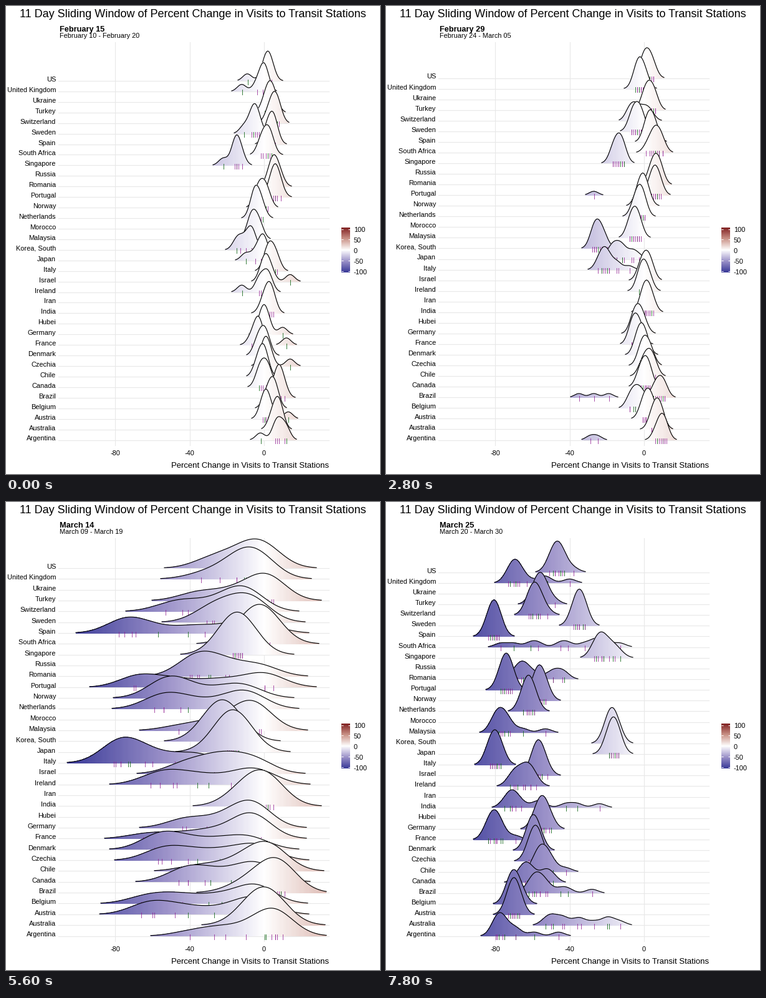
Animation of 600 by 750 pixels, one loop 8 s. Source, as a matplotlib script:

```python
import numpy as np
import matplotlib.pyplot as plt
from matplotlib.animation import FuncAnimation
from matplotlib.collections import LineCollection, PolyCollection
from matplotlib.colors import LinearSegmentedColormap

W, H, DPI = 600, 750, 100
FRAMES, STEP = 40, 200
DAYS = np.arange(45)          # day 0 is Saturday, February 15
ZERO, UNIT = 414, 2.9875      # x of 0 % and pixels per percent
LEFT, RIGHT = 84, 518
BOTTOM = 695.5
OVERLAP = 4                   # tallest possible ridge, in rows
GRID = "#e8e8e8"

plt.rcParams["font.family"] = "Liberation Sans"

rows, series = [], {}


def add(name, start=None, *steps, sunday=0, carnival=0):
    """Daily visits: smooth steps (day, level) from a start level, plus scatter.

    sunday shifts the first Sunday, carnival is a number of days off.
    """
    rows.append(name)
    if start is None:
        return
    scatter = 7 * ((DAYS * 0.618 + 0.37 * len(rows)) % 1 - 0.5)
    vals, level = start + scatter, start
    for day, to in steps:
        vals += (to - level) / (1 + np.exp((day - DAYS) / 1.5))
        level = to
    if sunday:
        vals[1] = start + sunday
    n = carnival
    vals[9:9 + n] = -27 + (np.arange(n) - (n - 1) / 2) * 4 * (n - 1)
    series[name] = np.round(vals)


add("US", 2, (29, -18), (33, -48), sunday=-11)
add("United Kingdom", -2, (28, -12), (34, -71), sunday=-10)
add("Ukraine")
add("Turkey", 3, (31.5, -57))
add("Switzerland", 5, (13, -8), (30.5, -59))
add("Sweden", -4, (29.5, -35), sunday=-7)
add("Spain", 4, (27.6, -81))
add("South Africa", 1, (11, 8), (21, 0), (33, -24), (40.5, -79))
add("Singapore", -14, (37, -25), sunday=-8)
add("Russia")
add("Romania", 6, (26, -38), (37, -67))
add("Portugal", 6, (28.2, -74), carnival=1)
add("Norway", -1, (26.6, -56))
add("Netherlands", -3, (28.4, -62))
add("Morocco")
add("Malaysia", -5, (32.7, -78))
add("Korea, South", -5, (6, -25), (30, -17), sunday=-10)
add("Japan", -2, (12, -17), sunday=-8)
add("Italy", 5, (9, -22), (25.3, -80))
add("Israel", 1, (26, -25), (32, -58), sunday=13)
add("Ireland", 0, (28.3, -61), (41, -74), sunday=-12)
add("Iran")
add("India", 2, (30, -9), (35.7, -73))
add("Hubei")
add("Germany", 1, (9, -4), (31, -56), sunday=9)
add("France", -4, (31.4, -82), sunday=16)
add("Denmark", -1, (27.3, -59))
add("Czechia", 1, (28.4, -59), sunday=13)
add("Chile", -2, (11, 4), (32, -56))
add("Canada", 0, (28.8, -48), (37, -65))
add("Brazil", 8, (33.8, -59), carnival=3)
add("Belgium", 4, (9, -10), (14, 0), (29.3, -70))
add("Austria", 2, (28.6, -70), sunday=11)
add("Australia", 7, (27, -3), (34, -22), (39, -53))
add("Argentina", 9, (30.5, -28), (34, -78), sunday=-11, carnival=2)

cmap = LinearSegmentedColormap.from_list(
    "muted", ["#3a3a98", "#9c92c9", "#ffffff", "#cb958a", "#832424"])
xs = np.arange(96, 515, 2.0)
us = (xs - ZERO) / UNIT
strip_colors = cmap(((us[:-1] + us[1:]) / 2 + 105) / 210)
PURPLE, GREEN = (0.56, 0.1, 0.56, 0.75), (0.1, 0.42, 0.12, 0.85)


def bandwidth(i):
    """Widest while most places are in the middle of their fall."""
    return 2.4 + 8.6 * np.exp(-((i - 30) / 6) ** 2)


def top_base(i):
    """Baseline of the first row; it rises as its ridge gets flatter."""
    return np.interp(i, [0, 14, 23, 28, 34, 39], [120, 115.5, 107, 106, 101, 112.5])


def window(i):
    return slice(max(i - 5, 0), i + 6)


def profile(name, i):
    vals = series[name][window(i)]
    return np.exp(-((us[:, None] - vals) / bandwidth(i)) ** 2 / 2).mean(axis=1)


def date(day):
    n = 15 + day
    return f"February {n:02d}" if n <= 29 else f"March {n - 29:02d}"


def px(width):
    return width * 72 / DPI


fig = plt.figure(figsize=(W / DPI, H / DPI), dpi=DPI, facecolor="white")
ax = fig.add_axes([0, 0, 1, 1])
ax.axis("off")


def text(x, y, s, size, **kw):
    return ax.text(x, y, s, fontsize=px(size), va="baseline", **kw)


text(300, 18, "11 Day Sliding Window of Percent Change in Visits to Transit Stations",
     18, ha="center")
day_text = text(86, 41, "", 12.7, weight="bold")
span_text = text(86, 51, "", 11)
text(RIGHT, 740, "Percent Change in Visits to Transit Stations", 13.15, ha="right")

for v in (-80, -40, 0):
    x = ZERO + v * UNIT
    ax.plot([x, x], [58, 704], color=GRID, lw=px(1.1), zorder=1)
    text(x, 720, str(v), 11, ha="center")

# colour key
ax.imshow(np.linspace(1, 0, 72)[:, None], cmap=cmap, aspect="auto",
          extent=(538, 552, 427, 355), zorder=2)
for v in (100, 50, 0, -50, -100):
    y = 391 - v * 0.335
    for x in (538, 549):
        ax.plot([x, x + 3], [y, y], color="white", lw=px(1), zorder=3,
                solid_capstyle="butt")
    text(558, y + 5, str(v), 11)

labels, grids, ridges = [], [], {}
for r, name in enumerate(rows):
    labels.append(text(80, 0, name, 11, ha="right"))
    grids += ax.plot([LEFT, RIGHT], [0, 0], color=GRID, lw=px(1.1), zorder=1)
    if name in series:
        z = 10 + 3 * r
        fill = PolyCollection([], linewidths=0, antialiaseds=False, zorder=z)
        ticks = LineCollection([], linewidths=px(1), antialiaseds=False, zorder=z + 1)
        ax.add_collection(fill, autolim=False)
        ax.add_collection(ticks, autolim=False)
        line, = ax.plot([], [], color="black", lw=px(1.15), zorder=z + 2)
        ridges[name] = fill, ticks, line

ax.set_xlim(0, W)
ax.set_ylim(H, 0)


def draw_ridge(name, i, base, height):
    fill, ticks, line = ridges[name]
    p = profile(name, i)
    keep = p > 0.01
    y = base - height * p
    line.set_data(xs, np.where(keep, y, np.nan))

    on = np.flatnonzero(keep[:-1] & keep[1:])
    fill.set_verts([[(xs[k], base), (xs[k], y[k]), (xs[k + 1], y[k + 1]),
                     (xs[k + 1], base)] for k in on])
    fill.set_facecolor(strip_colors[on])

    w = window(i)
    tx = np.floor(ZERO + series[name][w] * UNIT) + 0.5
    ticks.set_segments([[(x, base - 2.5), (x, base + 5.5)] for x in tx])
    ticks.set_color([GREEN if d % 7 < 2 else PURPLE for d in DAYS[w]])


def update(i):
    day_text.set_text(date(i))
    span_text.set_text(f"{date(i - 5)} - {date(i + 5)}")
    top = top_base(i)
    gap = (BOTTOM - top) / (len(rows) - 1)
    for r, name in enumerate(rows):
        base = top + gap * r
        labels[r].set_y(base + 1)
        grids[r].set_ydata([base, base])
        if name in ridges:
            draw_ridge(name, i, base, OVERLAP * gap)
    return []


anim = FuncAnimation(fig, update, frames=FRAMES, interval=STEP, repeat=True,
                     repeat_delay=0, init_func=lambda: update(0), blit=False)
plt.show()
```
